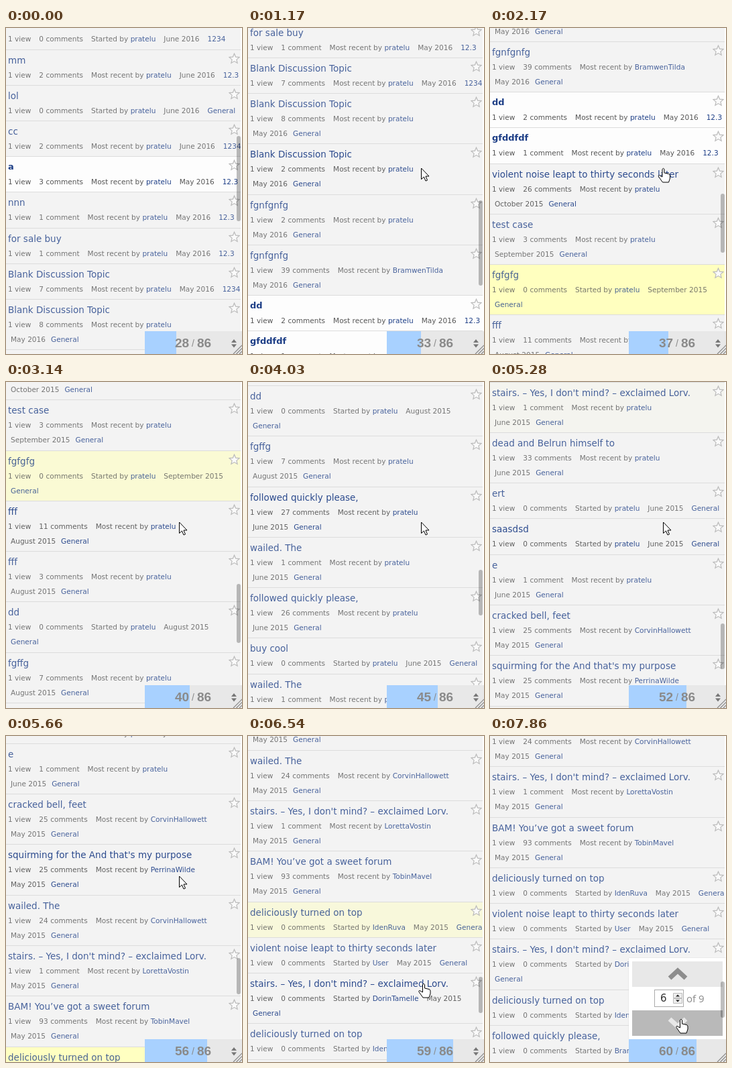
An HTML page that plays this animation: 352x486 px, repeating every 8000 ms.

```html
<!DOCTYPE html>
<html lang="en">
<head>
<meta charset="utf-8">
<title>Discussion list with scroll progress</title>
<style>
html, body { margin: 0; width: 100%; height: 100%; overflow: hidden; background: #fff; }
#stage { position: relative; width: 352px; height: 486px; overflow: hidden; font-family: "DejaVu Sans", sans-serif; }
#list { position: absolute; left: 0; top: 0; width: 350px; height: 486px; background: #f4f4f4; overflow: hidden; }
.row { position: absolute; left: 0; width: 350px; border-top: 1px solid #dcdcdc; box-sizing: border-box; background: #f3f3f3; }
.row.unread { background: #fdfdfd; }
.body { opacity: .8; white-space: nowrap; color: #555; }
.hover .body { opacity: .93; }
.unread .body { opacity: 1; }
.title { position: absolute; left: 3px; top: 5px; font-size: 13.5px; line-height: 20px; color: #1d3e86; }
.unread .title { font-weight: bold; font-size: 13px; }
.meta { position: absolute; left: 3px; top: 26px; font-size: 10.55px; line-height: 22px; }
.meta span { margin-right: 12px; }
.meta .second { position: absolute; left: 4px; top: 22px; margin: 0; }
.second span { margin-right: 8px; }
.meta b { font-weight: normal; color: #1d3e86; }
.star { position: absolute; left: 332px; top: 4px; fill: #fafafa; stroke: #bbb; stroke-width: 1.2; }
#bar { position: absolute; left: 207px; top: 452px; width: 145px; height: 34px; background: #e8e8e8; }
#fill { position: absolute; left: 0; top: 0; height: 34px; background: #a8d1ff; }
#bar span { position: absolute; top: 7px; color: #8a8a8a; font: bold 19px/22px "Liberation Sans", sans-serif; }
#bar svg { position: absolute; left: 0; top: 0; }
#panel { position: absolute; left: 207px; bottom: 34px; width: 145px; overflow: hidden; background: #fff; box-shadow: 0 0 1px #bbb; }
#panel > * { position: absolute; }
.button { left: 5px; width: 135px; height: 38px; background: #e8e8e8; }
.button path { fill: none; stroke: #8d8d8d; stroke-width: 7; }
.button.hover { background: #b9b9b9; }
.button.hover path { stroke: #e8e8e8; }
#page { left: 38px; top: 47px; width: 44px; height: 26px; box-sizing: border-box; border: 1px solid #aaa; font: 15px/24px "DejaVu Sans", sans-serif; text-indent: 8px; color: #333; }
#page svg { position: absolute; left: 27px; top: 4px; }
#of { left: 86px; top: 49px; font: 15px/22px "Open Sans", sans-serif; color: #888; }
#thumb { position: absolute; left: 344px; width: 6px; border-radius: 3px; background: rgba(0, 0, 0, .25); }
#cursor { position: absolute; left: 0; top: 0; overflow: visible; fill: #fff; stroke: #000; stroke-width: 1; }
</style>
</head>
<body>
<div id="stage">
  <div id="list"></div>
  <div id="panel">
    <div class="button" style="top:5px"><svg width="135" height="38"><path d="M56 25L68 14 80 25"/></svg></div>
    <div id="page">6<svg width="14" height="16"><path d="M.5.5h13v7H.5zM.5 8.5h13v7H.5z" fill="#eee" stroke="#bbb"/><path d="M4 5.5h6L7 2.5zM4 10.5h6L7 13.5z" fill="#222"/></svg></div>
    <div id="of">of 9</div>
    <div class="button" id="down" style="top:78px"><svg width="135" height="38"><path d="M56 13L68 24 80 13"/></svg></div>
  </div>
  <div id="bar">
    <div id="fill"></div>
    <span id="count" style="left:45px"></span>
    <span style="left:70px;font-size:14px;font-weight:normal">/</span>
    <span style="left:78px">86</span>
    <svg width="145" height="34"><path id="arrows" d="M129 17h8l-4-5zM129 19.5h8l-4 5z" fill="#777"/><path d="M132 34L145 21M136.5 34L145 25.5M141 34L145 30" stroke="#888" stroke-width="1.2"/></svg>
  </div>
  <div id="thumb"></div>
  <svg id="cursor" width="1" height="1"><path id="arrow" d="M0 0V16.5L4 13 6.500 19 9 18 6.500 12H11.500Z"/><path id="hand" d="M-1.5 1.5Q0-1 1.5 1.5V7L8 8.5Q10 9 10 11V15L8 21H-1L-6 14Q-8.5 11-6 10.5L-1.5 13Z"/></svg>
</div>
<script>
const $ = id => document.getElementById(id);
const DURATION = 8000, FIRST = 20, TOTAL = 86;
const stairs = "stairs. – Yes, I don't mind? – exclaimed Lorv.";
const followed = 'followed quickly please,';
const violent = 'violent noise leapt to thirty seconds later';
const delicious = 'deliciously turned on top';

// title ("*" is unread), comments, date, category ("|" starts a new line), author
const topics = [
  ['mm', 0, 'June 2016', '1234'],
  ['mm', 2, 'June 2016', '12.3'],
  ['lol', 0, 'June 2016'],
  ['cc', 2, 'June 2016', '1234'],
  ['*a', 3, 'May 2016', '12.3'],
  ['nnn', 1, 'May 2016', '12.3'],
  ['for sale buy', 1, 'May 2016', '12.3'],
  ['Blank Discussion Topic', 7, 'May 2016', '1234'],
  ['Blank Discussion Topic', 8, 'May 2016'],
  ['Blank Discussion Topic', 2, 'May 2016'],
  ['fgnfgnfg', 2, 'May 2016'],
  ['fgnfgnfg', 39, 'May 2016', 'General', 'BramwenTilda'],
  ['*dd', 2, 'May 2016', '12.3'],
  ['*gfddfdf', 1, 'May 2016', '12.3'],
  [violent, 26, 'October 2015'],
  ['test case', 3, 'September 2015'],
  ['fgfgfg', 0, 'September 2015', '|General'],
  ['fff', 11, 'August 2015'],
  ['fff', 3, 'August 2015'],
  ['dd', 0, 'August 2015', '|General'],
  ['fgffg', 7, 'August 2015'],
  [followed, 27, 'June 2015'],
  ['wailed. The', 1, 'June 2015'],
  [followed, 26, 'June 2015'],
  ['buy cool', 0, 'June 2015'],
  ['wailed. The', 1, 'June 2015'],
  [stairs, 1, 'June 2015'],
  ['dead and Belrun himself to', 33, 'June 2015'],
  ['ert', 0, 'June 2015'],
  ['saasdsd', 0, 'June 2015'],
  ['e', 1, 'June 2015'],
  ['cracked bell, feet', 25, 'May 2015', 'General', 'CorvinHallowett'],
  ["squirming for the And that's my purpose", 25, 'May 2015', 'General', 'PerrinaWilde'],
  ['wailed. The', 24, 'May 2015', 'General', 'CorvinHallowett'],
  [stairs, 1, 'May 2015', 'General', 'LorettaVostin'],
  ['BAM! You’ve got a sweet forum', 93, 'May 2015', 'General', 'TobinMavel'],
  [delicious, 0, 'May 2015', 'General', 'IdenRuva'],
  [violent, 0, 'May 2015', 'General', 'User'],
  [stairs, 0, 'May 2015', '|General', 'DorinTamelle'],
  [delicious, 0, 'May 2015', 'General', 'IdenRuva'],
  [followed, 0, 'May 2015', '|General', 'BramwenTilda']
];

const starPoints = Array.from({ length: 10 }, (_, i) => {
  const angle = i * Math.PI / 5, radius = i % 2 ? 3.6 : 7.8;
  return `${(8.5 + radius * Math.sin(angle)).toFixed(1)},${(9 - radius * Math.cos(angle)).toFixed(1)}`;
}).join(' ');

let nextTop = -21.7;
const rows = topics.map(([name, comments, date, category = 'General', author = 'pratelu'], i) => {
  const unread = name[0] === '*';
  const title = name.replace('*', '');
  const wrapDate = comments > 0 && category === 'General';
  const wrapCategory = category[0] === '|';
  const height = wrapDate || wrapCategory ? 75.3 : 53.2;
  const top = nextTop;
  nextTop += height;

  const dateTag = `<span>${date}</span>`;
  const categoryTag = `<span><b>${category.replace('|', '')}</b></span>`;
  const second = (wrapDate ? dateTag : '') + (wrapDate || wrapCategory ? categoryTag : '');
  const el = document.createElement('div');
  el.style.height = Math.ceil(height) + 'px';
  el.innerHTML = `<div class="body"><div class="title">${title}</div><div class="meta">` +
    `<span>1 view</span><span>${comments} comment${comments === 1 ? '' : 's'}</span>` +
    `<span>${comments ? 'Most recent' : 'Started'} by <b>${author}</b></span>` +
    (wrapDate ? '' : dateTag) + (second ? `<div class="second">${second}</div>` : categoryTag) +
    `</div></div><svg class="star" width="17" height="18"><polygon points="${starPoints}"/></svg>`;
  $('list').append(el);
  return { el, top, height, unread, number: FIRST + i, titleEl: el.querySelector('.title') };
});

// Each loaded page shrinks the scrollbar thumb and flashes its first row.
const pages = [
  { first: 26, load: -1e4, fade: -1e4, size: 127, top: 161, at: 0, slope: .313 },
  { first: 36, load: 2165, fade: 2450, size: 88, top: 247, at: 610, slope: .217 },
  { first: 46, load: 3680, fade: 3680, size: 68, top: 280, at: 1182.5, slope: .157 },
  { first: 56, load: 5590, fade: 5590, size: 54, top: 331, at: 1938.5, slope: .13 }
];

const scrollKeys = [
  [1010, 0], [1330, 610], [2450, 610], [2880, 860], [3140, 860], [3700, 1160], [4010, 1160],
  [4030, 1182.5], [4450, 1400], [4780, 1400], [4920, 1456], [5580, 1890], [5610, 1890],
  [5660, 1938.5], [6010, 2155.2], [6600, 2155.2], [6700, 2206]
];
const cursorKeys = [
  [260, 250, 440], [550, 258, 256], [730, 258, 256], [810, 258.5, 209], [6220, 258.5, 209],
  [6540, 262, 369], [6600, 262, 369], [6780, 285, 455], [7150, 285, 455], [7160, 285, 462],
  [7550, 285, 462], [7860, 285, 422]
];
const panelKeys = [[6720, 0], [6900, 121]];

function sample(keys, t, column = 1) {
  const next = keys.findIndex(key => key[0] > t);
  if (next === 0) return keys[0][column];
  if (next < 0) return keys[keys.length - 1][column];
  const a = keys[next - 1], b = keys[next];
  return a[column] + (b[column] - a[column]) * (t - a[0]) / (b[0] - a[0]);
}

const pageOf = row => pages.filter(page => page.first <= row.number).pop() || pages[0];
const isLoaded = (row, t) => t >= pageOf(row).load;
const countAt = t => rows.filter(row => isLoaded(row, t) && row.top < sample(scrollKeys, t) + 470).pop().number;

function render(t) {
  const scroll = sample(scrollKeys, t);
  const x = sample(cursorKeys, t), y = sample(cursorKeys, t, 2);
  const panelHeight = sample(panelKeys, t);
  const cursorShown = t >= 260;
  const overPanel = x > 207 && y > 452 - panelHeight;
  let pointing = cursorShown && overPanel;

  for (const row of rows) {
    const page = pageOf(row);
    const localY = y + scroll - row.top;
    const hovered = cursorShown && !overPanel && localY >= 0 && localY < row.height;
    row.el.className = 'row' + (row.unread ? ' unread' : '') + (hovered ? ' hover' : '');
    row.el.style.display = isLoaded(row, t) ? '' : 'none';
    row.el.style.top = Math.round(row.top - scroll) + 'px';
    if (row.number === page.first) {
      const flash = Math.min(1, Math.max(0, 1 - (t - page.fade) / 1750));
      row.el.style.background = flash ? `rgb(${243 + 12 * flash},${243 + 12 * flash},${243 - 52 * flash})` : '';
    }
    if (hovered && localY > 5 && localY < 26 && x < 3 + row.titleEl.offsetWidth) pointing = true;
  }

  const page = pages.filter(p => t >= p.load).pop();
  $('thumb').style.top = page.top + (scroll - page.at) * page.slope + 'px';
  $('thumb').style.height = page.size + 'px';

  $('count').textContent = countAt(t);
  $('fill').style.width = countAt(Math.max(0, t - 100)) / TOTAL * 145 + 'px';
  $('arrows').style.display = panelHeight ? 'none' : '';
  $('panel').style.height = panelHeight + 'px';
  $('down').className = 'button' + (panelHeight && y > 409 && y < 447 ? ' hover' : '');

  $('cursor').style.display = cursorShown ? '' : 'none';
  $('cursor').style.transform = `translate(${x}px,${y}px)`;
  $('arrow').style.display = pointing ? 'none' : '';
  $('hand').style.display = pointing ? '' : 'none';
}

const start = performance.now();
function tick() {
  render((performance.now() - start) % DURATION);
  requestAnimationFrame(tick);
}
tick();
</script>
</body>
</html>
```
